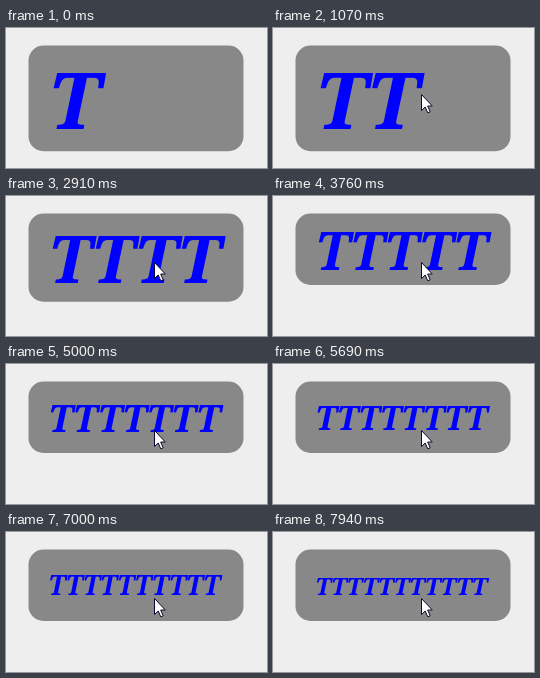
Recreate the animation shown at these times as an HTML page. Size 261x140 px, loop 8 s.

```html
<!DOCTYPE html>
<html lang="en">
<head>
<meta charset="utf-8">
<title>Auto-sizing text</title>
<style>
  html, body { margin: 0; width: 100%; height: 100%; overflow: hidden; background: #eee; }
  svg { display: block; width: 261px; height: 140px; }
  #label { font: italic bold 80px "Noto Serif", "DejaVu Serif", serif; fill: #00f; }
  #ring { fill: none; stroke: #fff; stroke-opacity: .6; stroke-width: 1.5; }
</style>
</head>
<body>
<svg viewBox="0 0 261 140">
  <rect id="box" x="22.5" y="17.5" width="215" height="105.5" rx="15" fill="#888"/>
  <text id="label" x="42.3" y="101">T</text>
  <circle id="ring" cx="148" cy="66" r="11"/>
  <path id="pointer" d="M.5 .5V16.5L4.2 13L6.8 18.8L9.2 17.8L6.7 12H11.3Z"
        fill="#fff" stroke="#0a0a30" stroke-width="1"/>
</svg>
<script>
const LOOP = 8000;
const MAX_SIZE = 78.7, TEXT_WIDTH = 172;
const TOP = 17.5, MIN_HEIGHT = 71.5;
// Font metrics in em
const ASCENT = 1.069, DESCENT = 0.293;
const PRESS = 170;
// Moments at which another letter is added
const ADDED = [1000, 1850, 2620, 3440, 4080, 4780, 5450, 6090, 6800, 7640];

const [box, label, ring, pointer] =
  ["box", "label", "ring", "pointer"].map(id => document.getElementById(id));

const pen = document.createElement("canvas").getContext("2d");
pen.font = 'italic bold 100px "Noto Serif", "DejaVu Serif", serif';
const advance = pen.measureText("T").width / 100;

function layout(count) {
  const size = Math.min(MAX_SIZE, TEXT_WIDTH / (count * advance));
  const height = Math.max(MIN_HEIGHT, size * (ASCENT + DESCENT) - 1.5);
  box.setAttribute("height", height);
  label.style.fontSize = size + "px";
  label.setAttribute("y", TOP + height / 2 + size * (ASCENT - DESCENT) / 2);
  label.textContent = "T".repeat(count);
}

function movePointer(t) {
  const p = Math.min(1, Math.max(0, (t - 60) / 610));
  const rest = (1 - p) ** 2;
  pointer.setAttribute("transform", `translate(${148 + 56 * rest} ${66 + 76 * rest})`);
}

let shown = 0;
function draw() {
  const t = performance.now() % LOOP;
  const count = 1 + ADDED.filter(a => t >= a).length;
  if (count !== shown) layout(shown = count);
  const pressed = ADDED.some(a => t >= a - PRESS && t < a);
  ring.setAttribute("visibility", pressed ? "visible" : "hidden");
  movePointer(t);
  requestAnimationFrame(draw);
}
draw();
</script>
</body>
</html>
```
